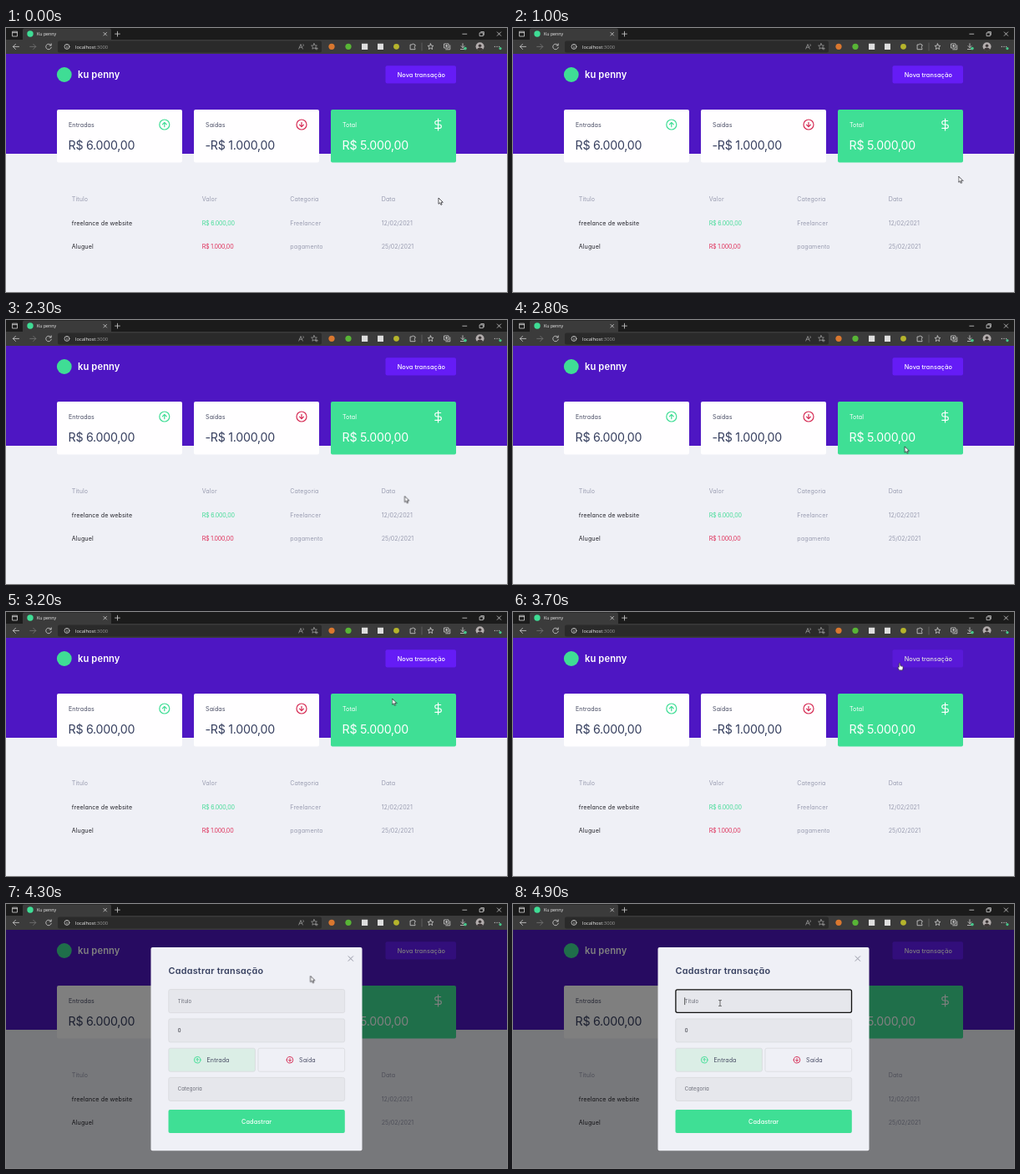
Animation, 600 px wide and 317 px high, one loop 5.1 s. Source, as an HTML page:

```html
<!DOCTYPE html>
<html lang="pt">
<head>
<meta charset="utf-8">
<title>Ku penny</title>
<style>
html, body { margin: 0; width: 100%; height: 100%; overflow: hidden; background: #eff0f6; }
svg { display: block; width: 600px; height: 317px; }
text { font: 400 7.1px Inter, "Open Sans", sans-serif; font-feature-settings: "cv11"; letter-spacing: .1px; }
.line { fill: none; stroke-linecap: round; stroke-linejoin: round; }
.ui { stroke: #d2d2d2; stroke-width: .8; }
.up { stroke: #3fdd95; }
.down { stroke: #d62c55; }

.tab { font: 400 5.3px "Open Sans", sans-serif; letter-spacing: 0; fill: #eee; }
.url { font-size: 5.8px; }
.brand { font-size: 11.2px; font-weight: 600; fill: #fff; }
.label { fill: #474b63; }
.sum { font-size: 14.2px; letter-spacing: -.25px; fill: #363f5f; }
.white { fill: #fff; }
.mute { fill: #999cb0; }
.date { letter-spacing: 0; }
.item { fill: #24242b; }
.cash { letter-spacing: -.2px; }
.strong { font-size: 7.3px; font-weight: 500; }
.head { font-size: 10.8px; font-weight: 600; letter-spacing: .25px; fill: #363f5f; }
.hint { font-size: 6px; fill: #696b76; }
.field { fill: #e6e7ec; stroke: #d6d7dc; stroke-width: .7; }

/* One loop is 5100 ms; 100 ms is 1.9608% */
.move, .arrow, .hand, .beam, .modal, .close, .focus, .hover { animation: 5100ms step-end infinite; }
.move { animation-name: move; }
.arrow { animation-name: arrow; }
.hand { animation-name: hand; }
.beam { animation-name: beam; }
.modal { animation-name: modal; }
.close { animation-name: close; }
.focus { animation-name: focus; }
.hover { animation-name: hover; animation-timing-function: linear; }

@keyframes move {
  0% { transform: translate(518px, 204px); animation-timing-function: steps(4); }
  7.84% { transform: translate(533px, 180px); }
  17.64% { transform: translate(533px, 180px); }
  19.6% { transform: translate(533.5px, 178px); animation-timing-function: steps(5); }
  29.41% { transform: translate(510px, 197px); animation-timing-function: steps(4); }
  37.25% { transform: translate(481px, 213px); }
  41.17% { transform: translate(479px, 212.5px); }
  45.09% { transform: translate(477.5px, 211.5px); animation-timing-function: steps(9); }
  62.74% { transform: translate(462.5px, 104px); animation-timing-function: steps(5); }
  72.54% { transform: translate(463px, 61.5px); }
  74.5% { transform: translate(460.5px, 60.5px); animation-timing-function: steps(2); }
  78.43% { transform: translate(452px, 62px); animation-timing-function: steps(7); }
  92.15%, 100% { transform: translate(248px, 119px); }
}
@keyframes arrow {
  0% { visibility: visible; }
  72.54% { visibility: hidden; }
  74.5% { visibility: visible; }
  88.23%, 100% { visibility: hidden; }
}
@keyframes hand {
  0% { visibility: hidden; }
  72.54% { visibility: visible; }
  74.5%, 100% { visibility: hidden; }
}
@keyframes beam { 0% { visibility: hidden; } 88.23%, 100% { visibility: visible; } }
@keyframes modal { 0% { opacity: 0; } 74.5%, 100% { opacity: 1; } }
@keyframes close { 0% { opacity: 0; } 76.47%, 100% { opacity: 1; } }
@keyframes focus { 0% { opacity: 0; } 96.07%, 100% { opacity: 1; } }
@keyframes hover {
  0%, 70.58% { filter: brightness(1); }
  72.54%, 75% { filter: brightness(.88); }
  78.43%, 100% { filter: brightness(1); }
}
</style>
</head>
<body>
<svg viewBox="0 0 600 317">
  <defs>
    <g id="rise">
      <circle r="6"/>
      <path d="M0 2.7V-2.7M-2.5 -.2L0 -2.7L2.5 -.2"/>
    </g>
    <path id="x" d="M-1 -1L1 1M1 -1L-1 1" vector-effect="non-scaling-stroke"/>
    <path id="star" d="M0 -3.4L1 -1.1L3.4 -.9L1.6 .8L2.1 3.2L0 1.9L-2.1 3.2L-1.6 .8L-3.4 -.9L-1 -1.1Z"/>
  </defs>

  <!-- Browser bars -->
  <path fill="#1b1b1b" d="M0 0H600V14H0Z"/>
  <path fill="#3b3b3b" d="M0 14H600V31H0ZM20 14V2.5Q20 .5 22 .5H124Q126 .5 126 2.5V14Z"/>
  <rect x="62" y="15.5" width="316" height="14" rx="2" fill="#2a2a2a"/>
  <circle cx="29" cy="7" r="3.7" fill="#3fdd95"/>
  <text class="tab" x="37" y="9">Ku penny</text>
  <text class="tab url" x="83" y="24.6">localhost<tspan fill="#999">:3000</tspan></text>

  <g class="line ui">
    <path d="M8 4.2H13.5V10H8ZM8 5.6H13.5"/>
    <use href="#x" transform="translate(118.7 7.2) scale(1.8)"/>
    <path d="M133.5 4.2V10M130.6 7.1H136.4"/>
    <path d="M546.8 7.2H551.8M567.5 5.8H571.3V9.6H567.5ZM568.8 4.6H572.4V8.3"/>
    <use href="#x" transform="translate(590.5 7.1) scale(2.2)"/>
    <path d="M15.5 22.4H8.5M11.5 19.3L8.4 22.4L11.5 25.5"/>
    <path stroke="#777" d="M28.7 22.4H35.7M32.7 19.3L35.8 22.4L32.7 25.5"/>
    <path d="M53.8 20.6A3.3 3.3 0 1 0 54.3 23.2M54.2 18.8V21H52"/>
    <circle cx="73" cy="22.4" r="3"/>
    <path d="M73 22.3V24M73 20.7V20.8"/>
    <g stroke="#999">
      <path d="M350.7 25L353 19.5L355.3 25M351.5 23.2H354.5M356 19.5Q357.2 20.6 356 21.8"/>
      <use href="#star" x="369" y="22"/>
      <path d="M372 23.4V26M370.7 24.7H373.3"/>
    </g>
    <path d="M484.5 20H486.3A1.3 1.3 0 0 1 488.8 20H490V22A1.3 1.3 0 0 0 490 24.4V25.7H484.5Z"/>
    <path stroke="#666" d="M498 18V27"/>
    <use href="#star" x="508.5" y="22.3"/>
    <path d="M525 19H530V24H525ZM526.8 25.8H531.8V20.8M527.5 20.4V22.6M526.4 21.5H528.6"/>
    <path d="M547 18.7V23.5M545 21.6L547 23.6L549 21.6M544.4 25.5H549.6"/>
    <path d="M585.3 22.3H585.4M588 22.3H588.1M590.7 22.3H590.8" stroke-width="1.2"/>
  </g>
  <circle cx="390" cy="22.3" r="3.6" fill="#d9772f"/>
  <circle cx="410" cy="22.3" r="3.6" fill="#58b536"/>
  <path fill="#dedede" d="M426 18.7H433.2V25.9H426ZM445 18.7H452V25.9H445Z"/>
  <circle cx="467.5" cy="22.3" r="3.4" fill="#b5b42c"/>
  <circle cx="550" cy="24.6" r="1.8" fill="#45c88a"/>
  <circle cx="592" cy="24.6" r="1.6" fill="#45c88a"/>
  <circle cx="567.6" cy="22.3" r="5" fill="#b3adad"/>
  <path fill="#3c3637" d="M564 25.8Q564.5 23.5 567.6 23.4Q570.7 23.5 571.2 25.8Q567.6 28.8 564 25.8Z"/>
  <circle cx="567.6" cy="21.3" r="1.8" fill="#3c3637"/>

  <!-- Page -->
  <path fill="#eff0f6" d="M0 31H600V317H0Z"/>
  <path fill="#4e16c3" d="M0 31H600V151H0Z"/>
  <circle cx="69.8" cy="56" r="8.9" fill="#3fdd95"/>
  <text class="brand" x="86" y="59.7">ku penny</text>
  <g class="hover">
    <rect x="454.5" y="45.3" width="84.5" height="21.2" rx="2" fill="#651cf6"/>
    <text class="strong white" x="468.7" y="58.7">Nova transação</text>
  </g>

  <g fill="#fffeff">
    <rect x="61" y="98" width="150" height="63.5" rx="2"/>
    <rect x="225" y="98" width="150" height="63.5" rx="2"/>
    <rect x="389" y="98" width="150" height="63.5" rx="2" fill="#3fdf95"/>
  </g>
  <text class="label" x="75" y="118.5">Entradas</text>
  <text class="label" x="239" y="118.5">Saídas</text>
  <text class="white" x="403" y="118.5">Total</text>
  <text class="sum" x="74.5" y="145.6">R$ 6.000,00</text>
  <text class="sum" x="238.5" y="145.6">-R$ 1.000,00</text>
  <text class="sum white" x="402.5" y="145.6">R$ 5.000,00</text>
  <g class="line" stroke-width="1.2">
    <use class="up" href="#rise" x="189.8" y="116"/>
    <use class="down" href="#rise" transform="translate(354 116) rotate(180)"/>
    <path stroke="#fff" stroke-width="1.8" transform="translate(510 108.4) scale(.63)"
      d="M12 1V23M17 5H9.5A3.5 3.5 0 0 0 9.5 12H14.5A3.5 3.5 0 0 1 14.5 19H6"/>
  </g>

  <g class="mute">
    <text x="78.8" y="208">Título</text>
    <text x="234.7" y="208">Valor</text>
    <text x="340.3" y="208">Categoria</text>
    <text x="449.7" y="208">Data</text>
    <text x="340.3" y="236.5">Freelancer</text>
    <text x="340.3" y="265">pagamento</text>
    <text class="date" x="449.7" y="236.5">12/02/2021</text>
    <text class="date" x="449.7" y="265">25/02/2021</text>
  </g>
  <text class="item" x="78.8" y="236.5">freelance de website</text>
  <text class="item" x="78.8" y="265">Aluguel</text>
  <text class="cash" x="234.7" y="236.5" fill="#45dc98">R$ 6.000,00</text>
  <text class="cash" x="234.7" y="265" fill="#df2f59">R$ 1.000,00</text>

  <!-- Dialog -->
  <g class="modal">
    <path fill-opacity=".5" d="M0 31H600V317H0Z"/>
    <rect x="173.5" y="52" width="253" height="244.3" rx="2" fill="#eff0f6"/>
    <text class="head" x="194.5" y="84.3">Cadastrar transação</text>
    <use class="close line" href="#x" stroke="#888b98" stroke-width=".9" transform="translate(412.8 65.5) scale(2.8)"/>
    <g class="field">
      <rect x="194.8" y="102.6" width="210.8" height="28" rx="2"/>
      <rect x="194.8" y="137.9" width="210.8" height="28" rx="2"/>
      <rect x="194.8" y="208.4" width="210.8" height="28" rx="2"/>
      <rect x="194.8" y="173.2" width="103.6" height="28" rx="2" fill="#dbeee6"/>
      <rect x="302" y="173.2" width="103.6" height="28" rx="2" fill="none"/>
    </g>
    <text class="hint" x="205.8" y="118.7">Título</text>
    <text class="hint" x="205.8" y="154" style="fill:#2b2c35">0</text>
    <text class="hint" x="205.8" y="224.3">Categoria</text>
    <g class="line" stroke-width="1.5">
      <use class="up" href="#rise" transform="translate(229.2 187.2) scale(.63)"/>
      <use class="down" href="#rise" transform="translate(340 187.2) scale(.63) rotate(180)"/>
    </g>
    <text class="label" x="240.5" y="189.8">Entrada</text>
    <text class="label" x="351" y="189.8">Saída</text>
    <rect x="194.5" y="247" width="211.3" height="28" rx="2" fill="#3fdf95"/>
    <text class="strong white" x="282" y="263.8">Cadastrar</text>
    <g class="focus line" stroke="#111">
      <rect x="194.9" y="102.9" width="210.6" height="27.4" rx="2" stroke-width="1.3"/>
      <path d="M205.7 112.7V120.7" stroke-width=".7"/>
    </g>
  </g>

  <!-- Pointer -->
  <g class="move" fill="#fff" stroke="#16161c" stroke-width=".7" stroke-linejoin="round">
    <path class="arrow" d="M0 0V7.3L1.7 5.8L2.9 8.4L4.1 7.9L3 5.3H5.3Z"/>
    <path class="hand" d="M-.8 .2Q0 -.8 .8 .2V3L3.2 3.6Q4.4 4 4.3 5.2L3.6 8.4H-.4L-2.4 5.2Q-2.4 4 -.8 5Z"/>
    <path class="beam line" stroke="#333" d="M-1.5 -3.6H-.6Q0 -3.6 0 -3V3Q0 3.6 -.6 3.6H-1.5M1.5 -3.6H.6Q0 -3.6 0 -3M0 3Q0 3.6 .6 3.6H1.5"/>
  </g>
</svg>
</body>
</html>
```
